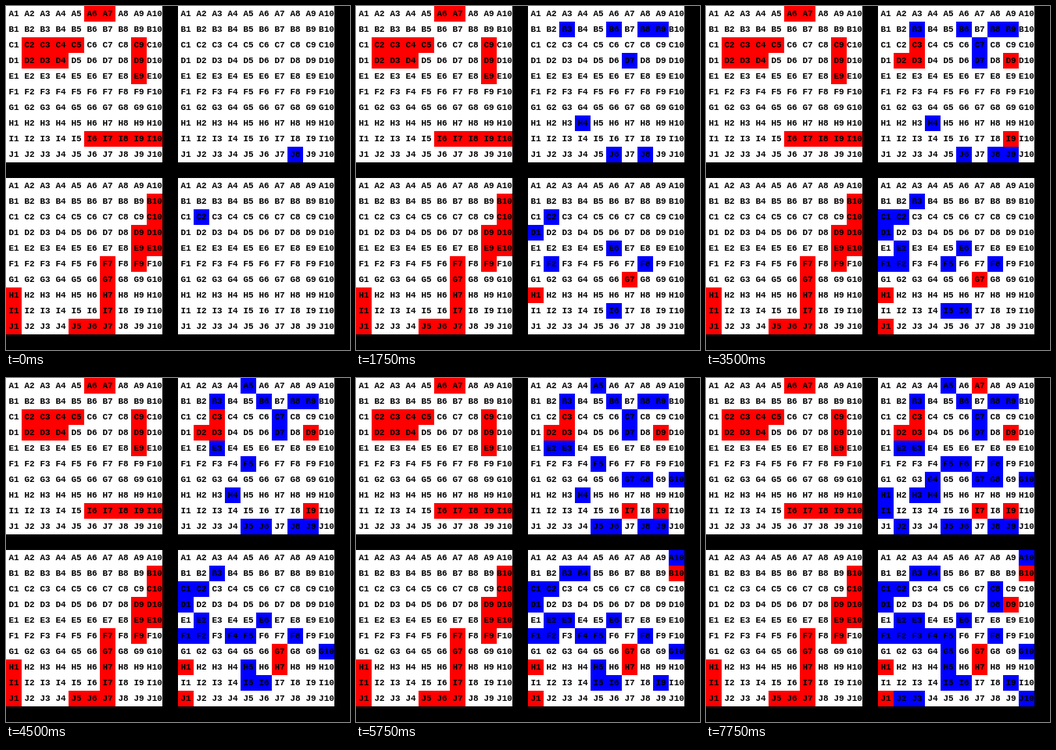
Animation of 440x440 px, one loop 8 s. Source, as an HTML page:

```html
<!DOCTYPE html>
<html lang="en">
<head>
<meta charset="utf-8">
<title>Grid battle</title>
<style>
  html, body { margin: 0; width: 100%; height: 100%; overflow: hidden; background: #000; }
  svg { display: block; width: 440px; height: 440px; }
  rect { shape-rendering: crispEdges; }
  text { font: bold 11px "Liberation Mono", monospace; text-anchor: middle; }
</style>
</head>
<body>
<svg id="stage" viewBox="0 0 440 440"></svg>
<script>
const CELL = 20, STEP = 250, LOOP = 8000;
const RED = '#f00', BLUE = '#00f';
const stage = document.getElementById('stage');

// Each side: its fleet on the left, the shots fired at it on the right.
const sides = [
  {
    y: 0,
    fleet: 'A6 A7 C2 C3 C4 C5 C9 D9 E9 D2 D3 D4 I6 I7 I8 I9 I10',
    shots: 'J8 B8 J6 B3 H4 D7 B9 B6 D3 D9 D2 I9 C3 C7 J9 F5 ' +
           'A5 E3 J5 E2 G8 I7 G7 G10 H1 J2 F8 A7 H3 I1 G4 F6'
  },
  {
    y: 220,
    fleet: 'B10 C10 D10 E10 D9 E9 F9 F7 G7 H7 I7 J7 H1 I1 J1 J5 J6',
    shots: 'C2 I6 G7 E6 H1 F8 D1 F2 C1 E2 F5 B3 F1 J1 I5 F4 ' +
           'G10 H7 H5 B4 B10 I9 E3 A10 D9 F3 J3 C8 G5 D8 J2 J10'
  }
];

function add(tag, attrs, label) {
  const el = document.createElementNS('http://www.w3.org/2000/svg', tag);
  for (const key in attrs) el.setAttribute(key, attrs[key]);
  if (label) el.textContent = label;
  return stage.appendChild(el);
}

function mark(x, y, name, fill) {
  return add('rect', {
    x: x + (name.slice(1) - 1) * CELL,
    y: y + (name.charCodeAt(0) - 65) * CELL,
    width: CELL, height: CELL, fill
  });
}

function board(x, y) {
  add('rect', { x, y, width: 200, height: 200, fill: '#fff' });
}

function labels(x, y) {
  for (let row = 0; row < 10; row++)
    for (let col = 0; col < 10; col++)
      add('text', { x: x + col * CELL + 10, y: y + row * CELL + 13 },
        String.fromCharCode(65 + row) + (col + 1));
}

const volleys = sides.map(({ y, fleet, shots }) => {
  const ships = fleet.split(' ');
  board(0, y);
  board(220, y);
  ships.forEach(name => mark(0, y, name, RED));
  const marks = shots.split(' ').map(name =>
    mark(220, y, name, ships.includes(name) ? RED : BLUE));
  labels(0, y);
  labels(220, y);
  return marks;
});

let shown = -1;
function draw(step) {
  if (step === shown) return;
  shown = step;
  for (const marks of volleys)
    marks.forEach((el, i) => el.setAttribute('visibility', i <= step ? 'visible' : 'hidden'));
}

const start = performance.now();
function tick() {
  draw(Math.floor((performance.now() - start) % LOOP / STEP));
  requestAnimationFrame(tick);
}
draw(0);
requestAnimationFrame(tick);
</script>
</body>
</html>
```
